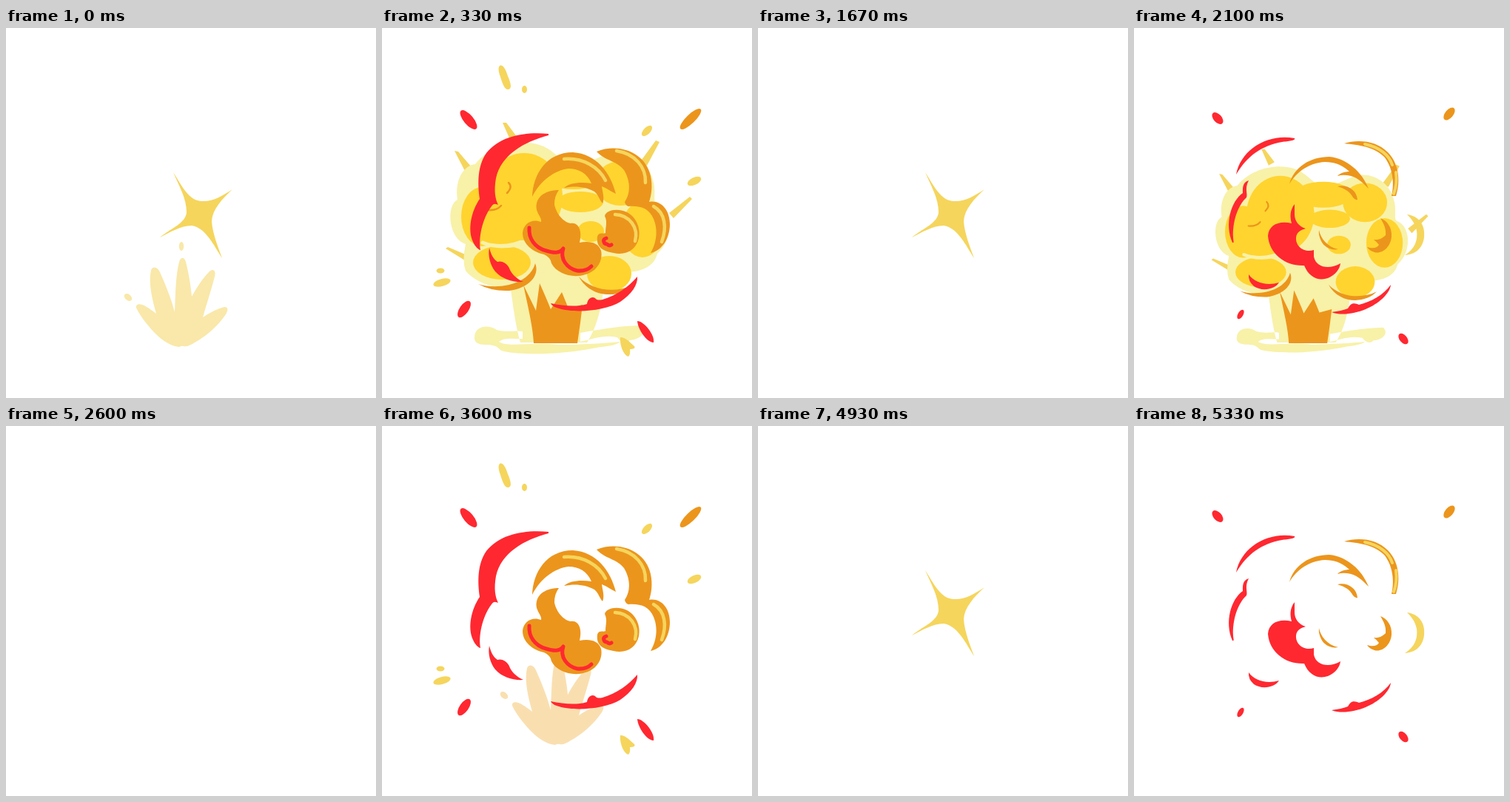
Recreate the animation shown at these times as an HTML page. Size 500 by 500 pixels, loop 5410 ms.

```html
<!DOCTYPE html>
<html lang="en">
<head>
<meta charset="utf-8">
<title>Explosion</title>
<style>
  html, body { margin: 0; width: 100%; height: 100%; overflow: hidden; background: #fff; }
  svg { display: block; width: 100%; height: 100%; }
</style>
</head>
<body>
<svg viewBox="0 0 500 500"><g id="blast"></g><g id="burst"></g></svg>
<script>
const LOOP = 5410;
const BG = '#fff', RED = '#ff2830', AMBER = '#ec951c', SAND = '#f5d55c';
const GOLD = '#ffd42f', PALE = '#f8f1a8', ORANGE = '#ff9500';

const fill = (color, ...ds) => `<path fill="${color}" d="${ds.join('')}"/>`;
const line = (color, width, ...ds) =>
  `<path fill="none" stroke="${color}" stroke-width="${width}" stroke-linecap="round" stroke-linejoin="round" d="${ds.join('')}"/>`;
const oval = (color, x, y, rx, ry = rx, turn = 0) =>
  `<ellipse fill="${color}" cx="${x}" cy="${y}" rx="${rx}" ry="${ry}" transform="rotate(${turn} ${x} ${y})"/>`;
const scale = (art, k, x, y) =>
  `<g transform="translate(${x} ${y}) scale(${k}) translate(${-x} ${-y})">${art}</g>`;

// Crescent bulging towards the given angle
const moon = (color, x, y, r, turn, thick) =>
  `<path fill="${color}" transform="translate(${x} ${y}) rotate(${turn})" d="M0 ${-r}Q${r * 1.5} 0 0 ${r}Q${r * 1.5 - thick} 0 0 ${-r}Z"/>`;

// Burst: star, then red and amber arcs
const star = fill(SAND, 'M226 195C238 214 247 233 264 234C280 235 292 227 306 218C292 231 279 245 278 261C279 278 287 297 292 311C281 294 270 270 251 267C236 267 222 276 208 283C222 271 243 264 244 249C244 230 234 214 226 195Z');

const arcs =
  fill(SAND,
    'M159 51C163 49 167 55 170 65C174 74 176 82 171 83C166 84 163 76 160 66C157 58 157 53 159 51Z',
    'M322 418C330 418 336 426 341 430C343 433 339 434 335 434Q336 441 333 444C326 442 321 428 322 418Z') +
  oval(SAND, 192.5, 83, 3.5, 5) + oval(SAND, 358, 139, 4.5, 9, 45) +
  oval(SAND, 422, 207, 10, 5, -25) + oval(SAND, 79, 328, 5.5, 3.5) + oval(SAND, 81, 344, 12, 5, -15) +
  oval(RED, 117, 124, 6.5, 16, -40) + oval(RED, 111, 380, 6, 13, 35) +
  fill(RED, 'M345 396C354 396 369 415 367 425C358 425 346 408 345 396Z') +
  oval(AMBER, 417, 123, 6, 19, 46) +
  fill(RED,
    'M225 143C195 140 160 145 141 169C129 186 129 210 132 231C121 247 115 272 123 289C126 296 131 300 133 300C130 285 135 258 148 241C151 236 154 238 157 239C153 231 151 220 154 203C161 171 192 154 225 145Z',
    'M145 297C143 308 146 320 153 329C163 340 178 344 191 343C182 339 176 333 173 327C170 318 162 314 156 316C150 312 147 305 145 297Z',
    'M228 372C246 376 264 377 277 373C278 366 283 362 288 365C290 368 294 368 298 367C318 361 334 349 345 336C346 347 337 360 322 370C300 383 258 386 236 378Q230 376 228 372Z') +
  fill(AMBER,
    'M203 228C204 198 222 168 258 168C290 170 309 196 316 224C311 222 305 217 297 214C298 222 301 230 298 237C294 233 293 226 287 221C275 214 260 213 246 216C254 209 268 208 283 210C277 196 266 190 252 190C234 192 214 206 203 228Z',
    'M290 167C320 155 356 168 363 200C366 214 364 226 361 235C376 232 389 245 389 265C389 285 378 301 363 304C370 292 374 275 367 258C361 244 350 240 333 241Q329 240 328 235C337 222 335 205 327 192C317 179 302 180 290 167Z',
    'M239 219C226 219 212 224 209 237C206 249 217 256 215 262C203 257 191 264 190 277C190 292 204 303 219 306Q228 310 229 318C236 332 258 339 275 333C290 329 299 315 296 301C293 290 280 287 267 290C271 275 266 262 255 264C243 262 234 247 233 238Q233 227 239 219Z',
    'M301 254C303 246 318 243 331 249C343 255 350 270 347 284C344 299 330 308 313 304C300 302 289 297 291 282C293 275 300 279 302 277C302 268 305 262 301 254Z') +
  line(SAND, 4.5, 'M246 177C272 175 293 188 302 206', 'M317 166C342 170 357 188 356 209',
    'M367 241C383 250 385 270 378 289', 'M315 252C335 253 347 270 342 288') +
  line(RED, 5, 'M199 270C198 284 206 297 222 301C232 304 240 305 245 298C240 312 250 325 264 328Q276 329 283 322',
    'M303 284C297 286 300 292 304 292Q307 295 310 293');

const thinArcs =
  oval(RED, 113, 122, 5.5, 9.5, -42) + oval(AMBER, 426, 116, 5.5, 10, 40) +
  oval(RED, 144, 387, 3.5, 7, 30) + oval(RED, 364, 420, 5, 8.5, -40) +
  fill(RED,
    'M138 198C144 165 180 142 217 149C219 152 208 153 200 154C172 159 153 173 138 198Z',
    'M155 206C146 209 147 217 147 223C131 234 122 265 133 290C136 291 134 287 134 283C133 262 140 240 152 229C154 224 149 217 155 206Z',
    'M155 333C163 344 179 349 196 344C190 354 172 356 162 349Q154 342 155 333Z',
    'M217 238C210 247 211 256 213 264C196 260 182 266 181 281C183 306 205 322 230 321C237 338 250 342 262 338C272 334 278 326 279 318C264 327 246 324 243 309V300C231 304 218 296 219 283C220 275 226 273 232 271C222 268 217 260 217 252Z',
    'M267 384C275 383 284 381 289 379C293 371 298 371 304 374C320 370 337 361 347 347C346 359 330 373 313 380C298 386 280 389 267 384Z') +
  fill(AMBER,
    'M210 211C216 188 238 174 264 174C287 176 308 194 317 217C308 208 300 200 288 199Q281 198 275 200C278 196 286 194 291 194C280 184 270 181 258 181C237 182 220 194 210 211Z',
    'M275 214C288 211 301 219 302 232Q299 233 296 229C291 220 284 217 275 214Z',
    'M284 156C302 150 328 152 343 168C357 182 361 205 354 227L348 227C353 207 348 186 338 174C323 160 304 158 284 156Z',
    'M250 273C252 284 261 296 276 299C266 301 257 296 253 288Q249 280 250 273Z',
    'M333 257C342 260 349 270 348 282C347 296 335 306 325 303Q318 301 315 296C322 298 328 298 331 293Q328 289 324 286C332 287 337 283 340 280C341 270 337 264 333 257Z') +
  line(SAND, 4, 'M312 157C332 161 345 172 349 185', 'M354 195Q356 211 351 224') +
  fill(SAND, 'M369 252C385 254 394 266 392 283C390 299 379 306 366 307C379 299 384 287 382 274C380 264 375 258 369 252Z');

// Blast: flame, yellow cloud, orange cloud, wisps
const flame = color =>
  fill(color, 'M234 431C222 430 210 421 203 414C194 405 182 391 176 378C175 372 183 372 190 377C194 379 199 383 203 386C198 368 192 345 196 327C199 321 205 323 208 330C216 348 223 365 228 384C229 362 229 335 234 316C236 309 241 309 243 316C247 332 250 350 251 363C258 350 266 338 275 329C281 324 284 329 282 336C278 352 271 373 266 391C275 385 286 379 295 377C301 377 300 382 297 387C287 402 270 417 255 425C249 429 244 431 240 430Q237 429 234 431Z') +
  oval(color, 237, 295, 3.2, 6) + oval(color, 165, 364, 6, 4, 40);

const yellowCloud =
  fill(PALE,
    'M125 418C125 402 145 400 155 408C170 412 182 408 190 410V420C175 420 165 418 158 424C170 432 200 424 240 428C270 428 300 426 322 424C315 430 300 430 290 432C240 442 190 442 165 437C155 435 160 428 140 428Q124 428 125 418Z',
    'M268 412C300 406 330 402 350 402C358 410 352 420 335 422C330 428 322 424 318 418C300 414 285 420 268 424Z',
    'M170 320C176 370 180 400 187 425L277 425C290 405 298 380 303 320Z') +
  fill(AMBER, 'M205 426C204 405 198 380 191 347L208 382L213 345Q222 365 228 380L243 357L252 379L271 374Q268 400 264 426Z') +
  fill(SAND,
    'M98 166L103 167L121 188L113 195Z', 'M163 128L168 128L183 148L174 153Z', 'M370 152L375 154L358 186L348 182Z',
    'M416 228L419 231L394 257L388 250Z', 'M86 298L89 296L115 307L112 314Z') +
  fill(PALE, 'M126 184C150 153 205 145 231 168L258 190L300 172C325 160 358 174 366 205C371 220 366 232 370 238C392 245 395 285 372 305C368 322 352 328 335 330C325 362 275 360 262 335L210 330C195 362 135 355 113 328Q108 315 113 292C90 285 86 240 102 232C98 207 109 186 126 184Z') +
  [[192, 228, 52, 59], [160, 262, 47, 30], [135, 255, 28, 40], [258, 198, 44, 20], [268, 235, 31, 14], [322, 210, 34, 30],
   [352, 272, 28, 38], [282, 275, 18, 14], [162, 317, 39, 23], [307, 332, 30, 24]]
    .map(e => oval(GOLD, ...e)).join('') +
  line(PALE, 5, 'M136 290C152 297 176 296 192 290') +
  fill(AMBER,
    'M130 346C160 355 200 345 207 318C214 335 197 352 172 355Q148 356 130 346Z',
    'M266 336C284 355 315 359 340 347C322 366 282 366 266 336Z') +
  line(AMBER, 2.5, 'M171 209Q177 215 169 223', 'M143 246Q155 247 161 240');

const paleRim = fill(PALE, 'M100 290C88 270 95 240 104 232L372 190C380 210 372 225 372 232C398 238 406 265 390 284C378 292 378 308 370 318C340 322 325 350 310 368C300 385 290 400 280 397C262 392 255 370 247 362Q240 372 228 374C215 370 212 358 207 357C198 372 188 382 175 379C160 370 145 352 122 345C105 338 107 325 113 314Z');
const goldRim = fill(GOLD, 'M180 365C165 350 150 345 128 335C118 328 118 315 118 305C95 300 93 260 104 257C98 230 105 188 157 188C160 160 200 142 232 158C245 165 250 175 253 184C275 178 295 184 310 191C335 168 372 178 374 205Q376 218 368 232C392 233 400 265 386 280Q375 290 372 300Z');
const spikes = fill(GOLD,
  'M171 106C186 118 196 135 203 152L186 157C186 140 180 122 171 106Z',
  'M78 173C98 177 114 186 126 197L109 208C104 195 95 183 78 173Z',
  'M399 149C383 149 364 160 351 178L370 184C376 170 387 159 399 149Z',
  'M427 212C410 214 394 226 382 240L389 254C395 238 410 223 427 212Z',
  'M77 296C93 291 108 296 120 305V316C108 305 93 298 77 296Z');
const core = color => fill(color, 'M118 262C112 225 125 198 150 198Q160 197 166 200C170 175 195 162 215 165C235 168 247 178 251 184C272 180 295 186 303 204C318 188 345 187 357 198C366 207 368 222 364 232C380 234 386 250 378 262C372 272 371 280 370 290C368 308 358 320 348 320C320 330 308 375 290 385C277 390 268 380 262 367C255 352 245 350 240 361Q235 372 226 369C222 360 214 348 207 346C199 347 200 365 184 367C175 366 175 350 160 330C150 315 135 305 124 295C112 285 108 270 118 262Z');
const dust = fill(PALE,
  'M118 418C118 402 140 398 150 405C163 410 175 407 187 411V416C170 414 150 414 140 416C136 420 138 430 127 431C118 430 122 422 118 418Z',
  'M287 409C310 402 330 405 340 400C352 396 365 402 362 409C350 413 330 409 315 412L287 414Z',
  'M369 411C378 412 382 420 372 425C366 428 360 425 363 420Q374 420 369 411Z',
  'M165 436C170 428 185 432 193 430C205 433 210 437 225 436L267 438C250 444 235 443 225 448C210 451 195 442 185 445C172 446 162 441 165 436Z',
  'M290 436C305 434 315 426 335 427C345 430 337 438 325 440C310 442 298 441 290 436Z');
const sparks = [[140, 84, 7, 5], [163.5, 91, 4, 3.5], [55, 153, 8, 6.5], [405.5, 129, 4.5], [459.5, 199, 7.5], [43, 286, 5.5, 3.5]]
  .map(e => oval(GOLD, ...e)).join('');

const orangeCloud = dust + paleRim + spikes + goldRim + core(ORANGE) +
  fill(GOLD, 'M216 233C226 245 245 248 263 247C282 246 297 240 307 233C304 255 307 275 313 284L320 286Q316 289 309 288C307 302 287 312 264 312C240 311 224 298 221 281C205 296 178 300 152 292Q151 288 155 288C182 292 205 283 222 272Q229 261 238 254C228 248 220 241 216 233Z') +
  oval(ORANGE, 264, 283, 40, 27) +
  fill(ORANGE, 'M179 398C190 402 200 407 208 408L207 390C220 395 230 402 236 410C243 400 254 394 267 391L268 406Q278 404 288 405C284 412 286 420 280 424C255 430 215 428 200 425C193 415 190 405 179 398Z') +
  sparks;

const hollow = dust + paleRim + goldRim + core(BG) + sparks;

const wisps = k =>
  [190, 225, 262, 300, 335, 10, 150].map((a, i) => {
    const rad = a * Math.PI / 180;
    return moon(i % 3 ? GOLD : PALE, 245 + 130 * Math.cos(rad), 270 + 98 * Math.sin(rad), 12 + 22 * k, a, 16 * k);
  }).join('') +
  oval(PALE, 135, 418, 15 * k, 8 * k) + oval(PALE, 335, 415, 24 * k, 6 * k) + oval(PALE, 210, 432, 34 * k, 6 * k) +
  oval(GOLD, 50, 153, 7 * k, 5 * k) + oval(GOLD, 38, 286, 5 * k, 3 * k);

const grow = k => scale(yellowCloud, k, 240, 425);
const spread = k => scale(arcs, k, 252, 255);

const burstPoses = [
  [0, star], [60, scale(star, 1.45, 257, 253)], [130, spread(.6)], [230, spread(.85)],
  [300, arcs], [400, thinArcs], [500, '']
];
const blastPoses = tint => [
  [0, flame(tint)], [100, scale(flame(GOLD), 1.3, 237, 430)], [170, grow(.6)], [270, grow(.88)],
  [330, yellowCloud], [400, orangeCloud], [500, hollow], [600, wisps(1)], [670, wisps(.65)],
  [730, wisps(.3)], [800, '']
];

const bursts = [30, 1670, 3300, 4930].map(start => ({ start, poses: burstPoses }));
const blasts = ['#f9e8a9', '#f9e4ac', '#f9dfb0'].map((tint, i) => ({ start: i * 1800, poses: blastPoses(tint) }));

function poseAt(runs, t) {
  const run = runs.filter(r => r.start <= t).pop() || runs[0];
  const age = Math.max(0, t - run.start);
  return run.poses.filter(p => p[0] <= age).pop()[1];
}

const layers = [['blast', blasts], ['burst', bursts]].map(([id, runs]) => ({ node: document.getElementById(id), runs, art: null }));

function render(t) {
  for (const layer of layers) {
    const art = poseAt(layer.runs, t);
    if (art !== layer.art) layer.node.innerHTML = layer.art = art;
  }
}

const begin = performance.now();
function tick() {
  // The last blast is over before the loop ends, so the tail stays empty
  render((performance.now() - begin) % LOOP);
  requestAnimationFrame(tick);
}
tick();
</script>
</body>
</html>
```
